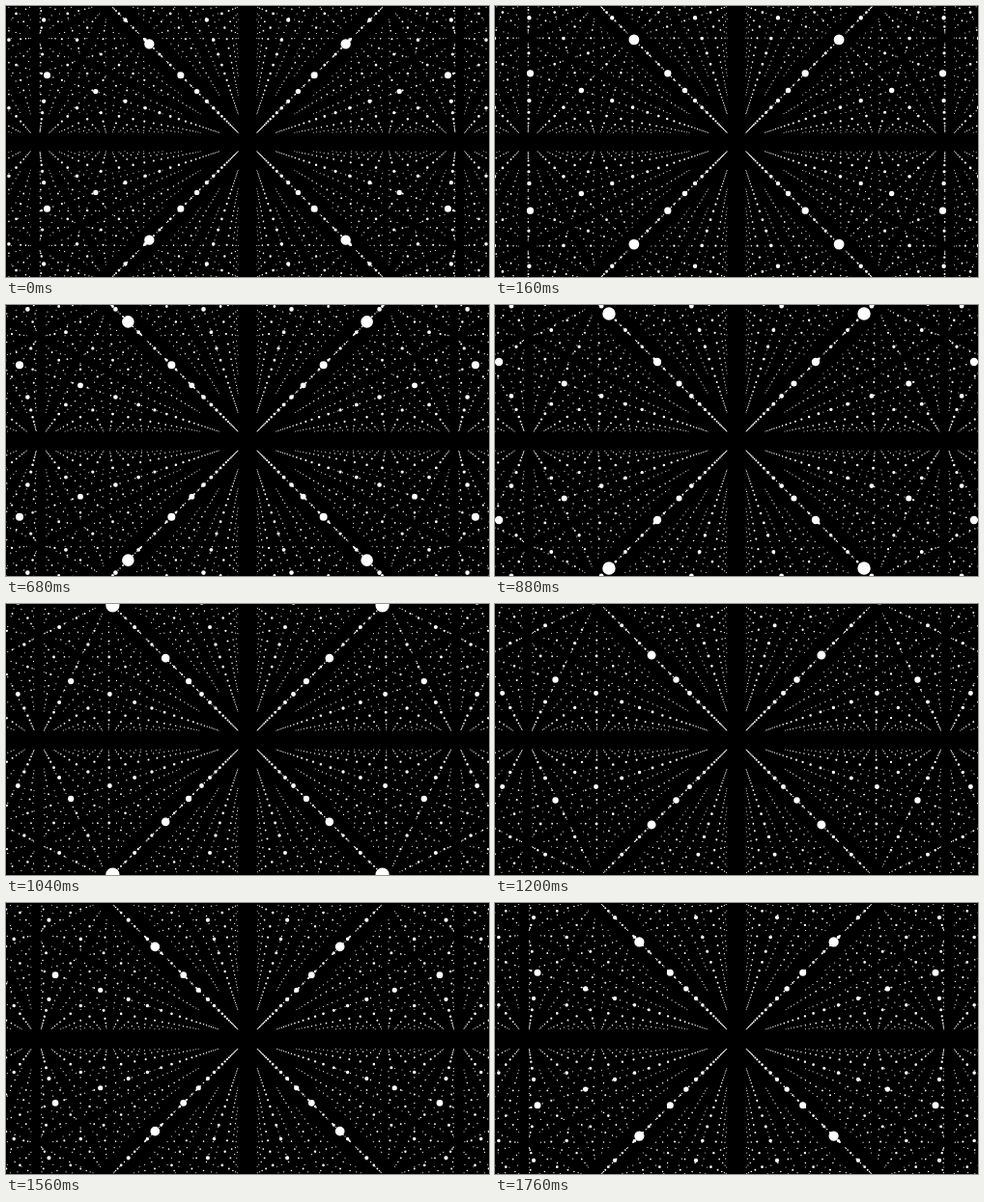
These frames come from a looping animation (500 px wide and 281 px high, 1800 ms). An HTML page with a canvas:

```html
<!DOCTYPE html>
<html lang="en">
<head>
<meta charset="utf-8">
<title>Dot lattice</title>
<style>
html, body { margin: 0; width: 100%; height: 100%; overflow: hidden; background: #000; }
canvas { display: block; }
</style>
</head>
<body>
<canvas id="stage" width="500" height="281"></canvas>
<script>
const W = 500, H = 281, CX = 250, CY = 141;
const LOOP = 1800;     // time to fly through one lattice cell
const LAYERS = 21;
const FOCAL = 216.2;   // half a cell in pixels at depth 1
const NEAREST = 2.127; // depth of the first layer when the loop starts
const ctx = document.getElementById("stage").getContext("2d");

function dot(x, y, r) {
  ctx.moveTo(x + r, y);
  ctx.arc(x, y, r, 0, 2 * Math.PI);
}

// Points sit at odd multiples of half a cell, mirrored in all four quadrants.
function drawLayer(depth) {
  const half = FOCAL / depth, r = half * 0.051;
  for (let y = half; y < CY + r; y += 2 * half) {
    for (let x = half; x < CX + r; x += 2 * half) {
      dot(CX - x, CY - y, r);
      dot(CX + x, CY - y, r);
      dot(CX - x, CY + y, r);
      dot(CX + x, CY + y, r);
    }
  }
}

function draw(time) {
  const phase = (time % LOOP) / LOOP;
  ctx.fillStyle = "#000";
  ctx.fillRect(0, 0, W, H);
  ctx.fillStyle = "#fff";
  for (let n = LAYERS - 1; n >= 0; n--) {
    ctx.beginPath();
    drawLayer(NEAREST + n - phase);
    ctx.fill();
  }
}

const start = performance.now();
function tick() {
  draw(performance.now() - start);
  requestAnimationFrame(tick);
}
tick();
</script>
</body>
</html>
```
